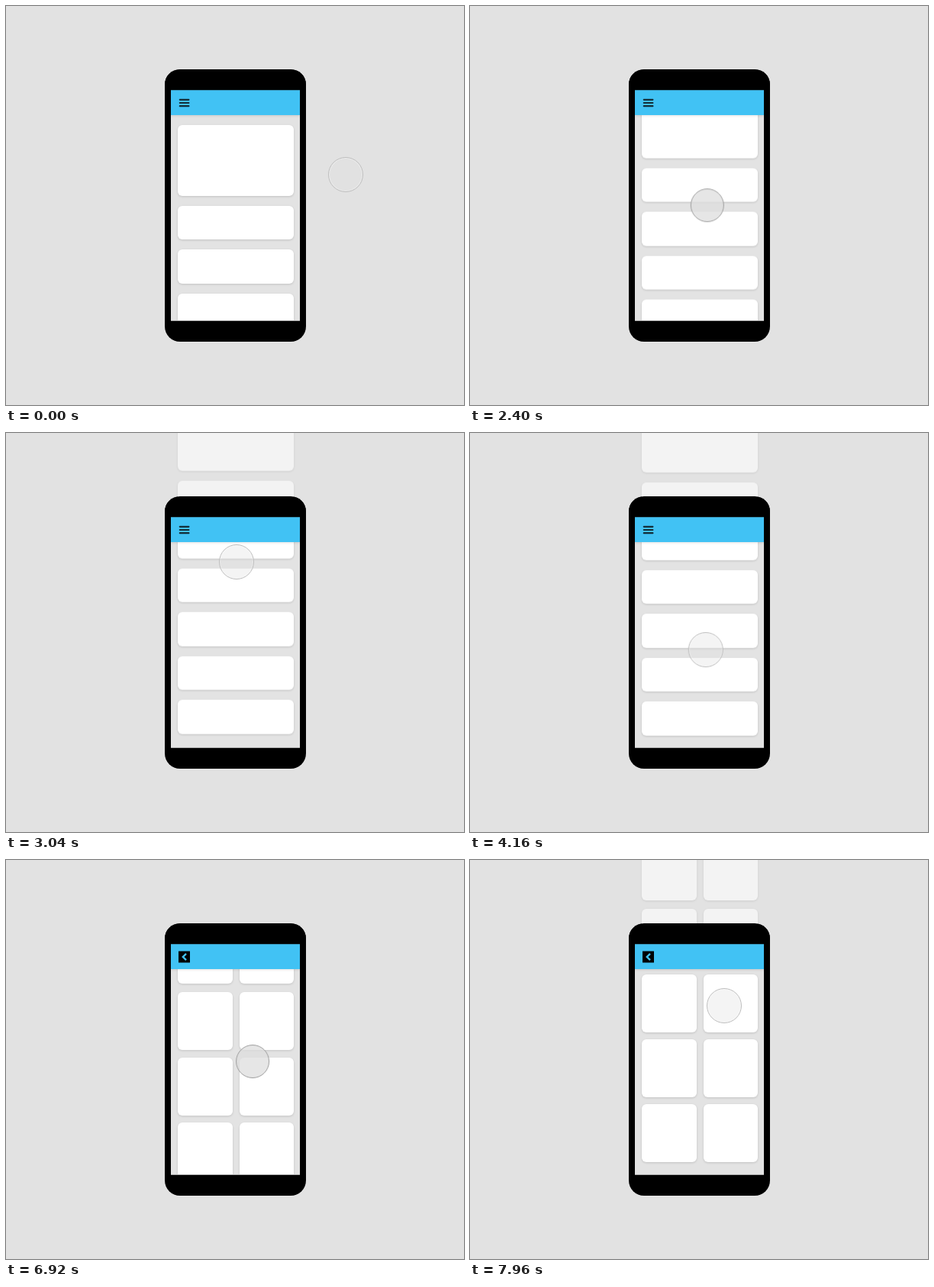
An HTML page for the animation above (8 s loop, 600 by 523 pixels).

```html
<!DOCTYPE html>
<html lang="en">
<head>
<meta charset="utf-8">
<title>Scrolling lists on a phone</title>
<style>
  html, body { margin: 0; width: 100%; height: 100%; overflow: hidden; background: #e2e2e2; }
  .stage { position: relative; width: 600px; height: 523px; overflow: hidden; }
  .stage div, .stage svg { position: absolute; box-sizing: border-box; }

  .phone { left: 208px; top: 83px; width: 185px; height: 357px; border-radius: 20px; background: #000; }
  .screen { left: 216px; top: 110px; width: 169px; height: 303px; background: #e3e3e3; border-bottom: 1px solid #aaa; }
  .window { left: 216px; top: 0; width: 169px; height: 412px; overflow: hidden; }
  .veil { left: 210px; top: 0; width: 179px; height: 90px; background: rgba(226, 226, 226, .41); }
  .forehead { left: 208px; top: 83px; width: 185px; height: 28px; border-radius: 20px 20px 0 0; background: #000; }
  .header { left: 216px; top: 110px; width: 169px; height: 33px; background: #41c2f4;
    border-top: 1px solid #3992b4; box-shadow: 0 1px 3px rgba(0, 0, 0, .12); }
  .header svg { left: 10px; top: 8px; }

  /* Both pages; every card is an i */
  .page { left: 9px; top: 155.5px; display: grid; }
  .page i { background: #fff; border-radius: 6px; box-shadow: 0 1px 3px rgba(0, 0, 0, .15); }
  .cards { grid-template: 93px repeat(6, 44.5px) / 152px; row-gap: 13px; animation-name: scroll-cards, first; }
  .tiles { grid-template: 87px 86px 85px 85.5px 76px / 72px 71px; column-gap: 9px; animation-name: scroll-tiles, second; }
  .tiles i { height: 76px; }
  .page { animation-duration: 8s; animation-iteration-count: infinite; animation-timing-function: linear, step-end; }
  .menu { animation: first 8s step-end infinite; }
  .back { animation: second 8s step-end infinite; }

  .cursor { left: -23px; top: -23px; width: 46px; height: 46px;
    animation: move-x 8s linear infinite, move-y 8s linear infinite; }
  .dot { inset: 0; border-radius: 50%; animation: press 8s step-end infinite; }

  @keyframes first { 0% { opacity: 1; } 61%, 100% { opacity: 0; } }
  @keyframes second { 0% { opacity: 0; } 61%, 100% { opacity: 1; } }

  /* Drag, fling past the end, settle back */
  @keyframes scroll-cards {
    0% { transform: none; }
    27.75% { transform: translateY(0); animation-timing-function: cubic-bezier(.33, 0, .6, .45); }
    32% { transform: translateY(-136px); animation-timing-function: cubic-bezier(.3, .57, .6, 1); }
    34.75% { transform: translateY(-205px); animation-timing-function: cubic-bezier(.15, 0, .1, 1); }
    43.75%, 100% { transform: translateY(-197.3px); }
  }
  @keyframes scroll-tiles {
    0% { transform: none; }
    83.75% { transform: translateY(0); animation-timing-function: cubic-bezier(.33, 0, .6, .45); }
    88% { transform: translateY(-136px); animation-timing-function: cubic-bezier(.3, .6, .6, 1); }
    90.25% { transform: translateY(-185px); animation-timing-function: cubic-bezier(.15, 0, .1, 1); }
    99.75%, 100% { transform: translateY(-179px); }
  }

  /* Separate easings per axis bend the path */
  @keyframes move-x {
    0% { translate: 445px; }
    7.5% { translate: 445px; animation-timing-function: cubic-bezier(.33, .1, .4, 1); }
    20.25% { translate: 312px; }
    27.75% { translate: 312px; animation-timing-function: cubic-bezier(.6, 0, .9, .7); }
    33.25% { translate: 302px; }
    39.5% { translate: 302px; animation-timing-function: cubic-bezier(.33, .25, .75, .7); }
    58.5% { translate: 313px; }
    83.75% { translate: 313px; animation-timing-function: cubic-bezier(.33, 0, .67, 1); }
    89.25%, 100% { translate: 333px; }
  }
  @keyframes move-y {
    0% { transform: translateY(221px); }
    7.5% { transform: translateY(221px); animation-timing-function: cubic-bezier(.33, 0, .67, 1); }
    20.25% { transform: translateY(310px); }
    27.75% { transform: translateY(310px); animation-timing-function: cubic-bezier(.38, 0, .65, 1); }
    33.25% { transform: translateY(169px); }
    39.5% { transform: translateY(169px); animation-timing-function: cubic-bezier(.33, .12, .6, 1); }
    58.5% { transform: translateY(314px); }
    77.5% { transform: translateY(314px); animation-timing-function: cubic-bezier(.33, 0, .67, 1); }
    82.5% { transform: translateY(333px); }
    83.75% { transform: translateY(333px); animation-timing-function: cubic-bezier(.38, 0, .65, 1); }
    89.25%, 100% { transform: translateY(191px); }
  }
  @keyframes press {
    0%, 33.25%, 61%, 89.25%, 100% {
      inset: 0;
      background: rgba(225, 225, 225, .36);
      border: 1px solid #bdbdbd;
      box-shadow: inset 0 0 0 1px rgba(255, 255, 255, .35);
    }
    24.5%, 59.5%, 83% {
      inset: 1px;
      background: rgba(222, 222, 222, .75);
      border: 1px solid #9c9c9c;
      box-shadow: none;
    }
  }
</style>
</head>
<body>
<div class="stage">
  <div class="phone"></div>
  <div class="screen"></div>
  <div class="window">
    <div class="page cards"><i></i><i></i><i></i><i></i><i></i><i></i><i></i></div>
    <div class="page tiles"><i></i><i></i><i></i><i></i><i></i><i></i><i></i><i></i><i></i><i></i></div>
  </div>
  <div class="veil"></div>
  <div class="forehead"></div>
  <div class="header">
    <svg class="menu" width="16" height="16">
      <path d="M1.8 3.8h11.6M1.8 8h11.6M1.8 12.2h11.6" stroke="#132e39" stroke-width="2.2" stroke-linecap="round"/>
    </svg>
    <svg class="back" width="16" height="16">
      <rect y=".5" width="15" height="15" fill="#000"/>
      <path d="M10 3.8L5.8 8l4.2 4.2" fill="none" stroke="#41c2f4" stroke-width="2.4"/>
    </svg>
  </div>
  <div class="cursor"><div class="dot"></div></div>
</div>
</body>
</html>
```
